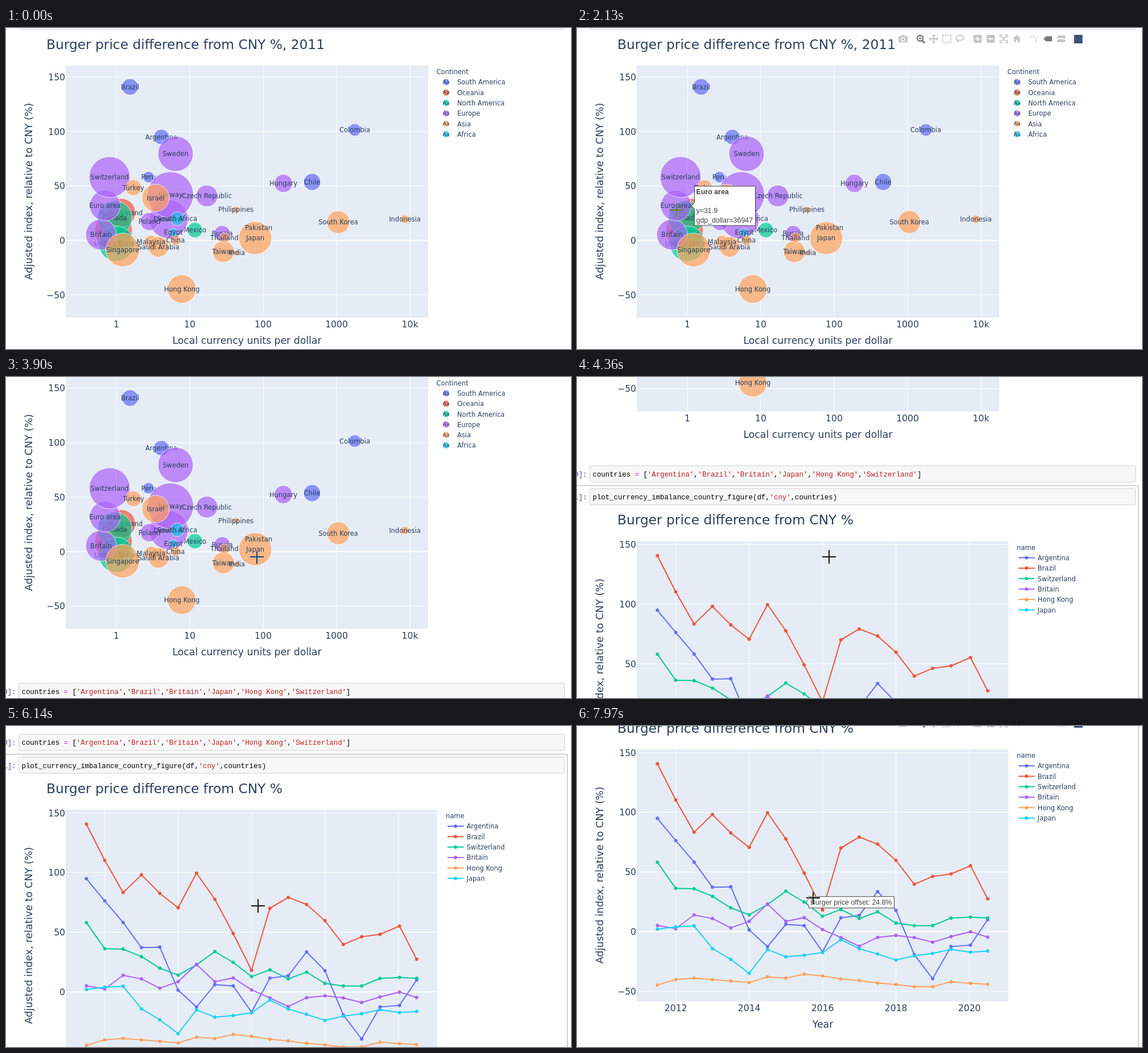
An HTML page for the animation above (8000 ms loop, 993 by 564 pixels).

```html
<!DOCTYPE html>
<html lang="en">
<head>
<meta charset="utf-8">
<title>Burger price charts</title>
<style>
html, body { margin: 0; width: 100%; height: 100%; overflow: hidden; background: #fff; }
svg { display: block; width: 100%; height: 100%; }
text { white-space: pre; }
.plot { font-family: "DejaVu Sans", Verdana, sans-serif; fill: #2a3f5f; }
.mono { font: 12.35px "Liberation Mono", monospace; fill: #000; }
.tip { font: 12.4px "Liberation Sans", Arial, sans-serif; fill: #444; }
#cursor { mix-blend-mode: difference; }
</style>
</head>
<body>
<svg id="stage" viewBox="0 0 993 564" xmlns="http://www.w3.org/2000/svg"></svg>
<script>
const LOOP = 8000, CHART2 = 576;
const BLUE = '#636efa', RED = '#ef553b', GREEN = '#00cc96',
      PURPLE = '#ab63fa', ORANGE = '#ffa15a', CYAN = '#19d3f3';

// name, x, y, radius
const continents = [
  ['South America', BLUE, [['Argentina', 273, 191.5, 13.5], ['Brazil', 218, 103.5, 14.5],
    ['Chile', 538, 270.5, 15], ['Colombia', 613, 179, 11], ['Peru', 250.5, 262, 10]]],
  ['Oceania', RED, [['Australia', 189, 356, 33], ['New Zealand', 202.5, 324.5, 25]]],
  ['North America', GREEN, [['Canada', 191, 334, 30.5], ['Mexico', 332, 355, 13.5],
    ['United States', 194, 379, 31]]],
  ['Europe', PURPLE, [['Britain', 167, 363, 27], ['Czech Republic', 353, 295, 19],
    ['Denmark', 286, 336, 34], ['Euro area', 174, 312, 27], ['Hungary', 487.5, 273, 16],
    ['Norway', 289, 293, 40.5], ['Poland', 252, 340, 16], ['Russia', 380, 361, 14],
    ['Sweden', 298, 221, 31], ['Switzerland', 182, 262, 36]]],
  ['Asia', ORANGE, [['China', 298, 373, 9], ['Hong Kong', 309, 458.5, 25],
    ['India', 406, 395, 5], ['Indonesia', 701, 336, 7.5], ['Israel', 263, 298.5, 24],
    ['Japan', 438, 369, 29], ['Malaysia', 255, 376, 12], ['Pakistan', 444, 351, 4],
    ['Philippines', 404, 319, 6], ['Saudi Arabia', 268, 384.5, 18], ['Singapore', 205, 390, 29.5],
    ['South Korea', 584, 341, 20], ['Taiwan', 382, 393, 19], ['Thailand', 384, 368.5, 9],
    ['Turkey', 224, 280.5, 14]]],
  ['Africa', '#19c0f0', [['Egypt', 294, 359, 7], ['South Africa', 301, 335, 12]]]
];

const series = [
  ['Argentina', BLUE, [94.9, 76.3, 58.2, 37.2, 37.5, 1.4, -12.6, 6, 5, -17, 11.5, 13.6, 33.5, 17.8, -19.3, -39.5, -12.6, -11.3, 10]],
  ['Brazil', RED, [140.6, 110.3, 83.3, 98.1, 82.6, 70.6, 99.6, 77.6, 49, 18.1, 70.1, 79.2, 73.3, 59.7, 39.7, 46.2, 48.3, 55.2, 27.4]],
  ['Switzerland', GREEN, [58.1, 36.2, 35.9, 29.6, 19.9, 14.1, 22.7, 33.8, 24.8, 12.8, 18.5, 10.9, 16.6, 7.1, 5, 5, 11.3, 12.1, 11.4]],
  ['Britain', PURPLE, [5.1, 2.5, 13.9, 10.9, 3.1, 8.6, 23.1, 8.6, 11.7, 1.7, -5, -12.3, -4.9, -3.3, -5, -8.9, -4.2, -0.1, -4.7]],
  ['Hong Kong', ORANGE, [-44.7, -40.2, -39, -40.2, -41.4, -42.7, -38, -39, -35.7, -37.2, -39.7, -41.1, -43.1, -44.4, -46.2, -46.2, -42.1, -43.3, -44.2]],
  ['Japan', CYAN, [2, 3.9, 4.7, -14.2, -23.4, -35, -15.1, -21.1, -19.8, -17.5, -6.8, -14.4, -18.8, -23.9, -20.3, -18.3, -14.9, -17.3, -16.4]]
];

// time, scroll offset (held until the next one)
const scrolls = [[0, 0], [3820, 12], [3900, 66.5], [3970, 115], [4050, 182], [4130, 250], [4200, 318],
  [4280, 390], [4360, 448.5], [4430, 474], [4510, 480], [4840, 505], [4960, 552], [5100, 576],
  [6100, 590], [6170, 632], [6250, 672], [6330, 704], [6400, 745], [6480, 772], [6570, 793],
  [6800, 775], [6880, 730], [6960, 696]];

// time, x, y (linear between)
const moves = [[70, 400, 493], [400, 350, 340], [810, 290, 228], [1210, 290, 228], [1520, 185, 268],
  [1670, 185, 268], [1900, 177, 308], [2050, 177, 310], [2130, 175, 320], [2290, 178, 358],
  [2440, 181, 364], [2520, 183, 379], [2900, 183, 379], [3050, 215, 388], [3250, 385, 364],
  [3440, 441, 316], [3900, 441, 316], [4200, 443, 316], [6400, 443, 316], [6720, 398, 240],
  [7040, 398, 240], [7110, 399, 242], [7260, 392, 225], [7400, 386, 212], [7560, 390, 232],
  [7720, 401, 262], [7890, 408, 285], [7970, 415, 302]];

// from, to, country, index, gdp
const bubbleTips = [[660, 1360, 'Sweden', 79.3, 48875], [1360, 1820, 'Switzerland', 58.1, 67246],
  [1820, 2200, 'Euro area', 31.9, 36947], [2200, 2980, 'Britain', 5.1, 36120],
  [2980, 3130, 'Singapore', -8.9, 43117], [3200, 3360, 'Russia', 6.3, 10437]];

// from, to, country
const lineTips = [[6720, 7110, 'Britain'], [7260, 7890, 'Brazil'], [7890, LOOP, 'Switzerland']];

const text = (x, y, s, size, anchor = 'start', more = '') =>
  `<text x="${x}" y="${y}" font-size="${size}" text-anchor="${anchor}" ${more}>${s}</text>`;
const rect = (x, y, w, h, fill, more = '') =>
  `<rect x="${x}" y="${y}" width="${w}" height="${h}" fill="${fill}" ${more}/>`;
const dot = (x, y, r, fill, more = '') =>
  `<circle cx="${x}" cy="${y}" r="${r}" fill="${fill}" ${more}/>`;
const path = (d, stroke, width = 1, fill = 'none') =>
  `<path d="${d}" stroke="${stroke}" stroke-width="${width}" fill="${fill}"/>`;
const each = (list, fn) => list.map(fn).join('');

function axes(width, top, zero, unit, x0, xLabels, xTitle, xMid, title) {
  const bottom = top + 443, mid = top + 221;
  let s = rect(105, top, width, 443, '#e5ecf6');
  s += each(xLabels, (label, i) => {
    const x = x0 + i * 129;
    return path(`M${x} ${top}V${bottom}`, '#fff') + text(x, bottom + 17, label, 15.6, 'middle');
  });
  s += each([150, 100, 50, 0, -50], v => {
    const y = zero - v * unit;
    return path(`M105 ${y}h${width}`, '#fff', v ? 1 : 2) +
      text(104, y + 5.7, String(v).replace('-', '\u2212'), 15.6, 'end');
  });
  return s + text(71, top - 29.5, title, 23.3) + text(xMid, bottom + 46, xTitle, 17.3, 'middle') +
    text(0, 0, 'Adjusted index, relative to CNY (%)', 17.7, 'middle', `transform="translate(46 ${mid}) rotate(-90)"`);
}

function bubbleChart() {
  return axes(637, 66, 373.3, 1.914, 194, ['1', '10', '100', '1000', '10k'],
      'Local currency units per dollar', 423.5, 'Burger price difference from CNY %, 2011') +
    each(continents, ([, color, list]) =>
      each(list, ([, x, y, r]) => dot(x, y, r, color, 'opacity=".7" stroke="#fff"')) +
      each(list, ([name, x, y]) => text(x, y + 4, name, 11.5, 'middle'))) +
    text(756.5, 81, 'Continent', 11.5) +
    each(continents, ([name, color], i) => {
      const y = 95 + i * 18.3;
      return dot(773.5, y, 5.5, color, 'opacity=".75"') + text(773.5, y + 3, 'Aa', 9.2, 'middle') +
        text(793, y + 4.4, name, 11.5);
    });
}

const pointX = i => 141.3 + 32.25 * i + (i === 17 ? 2 : 0);
const pointY = v => 481.2 - v * 2.096;

function lineChart() {
  return axes(653, 161, 481.2, 2.096, 173.7, [2012, 2014, 2016, 2018, 2020],
      'Year', 432, 'Burger price difference from CNY %') +
    each(series, ([, color, list]) =>
      path('M' + list.map((v, i) => `${pointX(i)} ${pointY(v)}`).join('L'), color, 2) +
      each(list, (v, i) => dot(pointX(i), pointY(v), 3, color))) +
    text(773, 176, 'name', 11.5) +
    each(series, ([name, color], i) => {
      const y = 190 + i * 18.35;
      return path(`M776 ${y}h28.5`, color, 2) + dot(790, y, 3, color) + text(809.5, y + 4.4, name, 11.5);
    });
}

function toolbar() {
  const soft = '#c5c5c9', dark = '#7a7a7c';
  const box = (x, mark) => rect(x - 7, 12, 14, 14, soft, 'rx="1"') + path(mark, '#fff', 2);
  return rect(565, 14.5, 16, 11, soft, 'rx="2"') + rect(570, 12.5, 6, 3, soft) +
    dot(573, 20, 3.2, soft, 'stroke="#fff" stroke-width="1.5"') +
    dot(603, 18, 5, 'none', `stroke="${dark}" stroke-width="2.4"`) +
    path('M607 22l4 4.5', dark, 3) + path('M600.5 18h5M603 15.5v5', dark, 1.3) +
    path('M620 19h14M627 12v14M622 17l-2 2 2 2M632 17l2 2-2 2M625 14l2-2 2 2M625 24l2 2 2-2', soft, 1.8) +
    rect(643, 12.5, 14, 13, 'none', `stroke="${soft}" stroke-width="2" stroke-dasharray="2.5 1.5"`) +
    path('M668 21c-4-4 0-9 6-8s8 6 3 8-9-1-9 1 3 1 2 4', soft, 1.8) +
    box(704, 'M700 19h8M704 15v8') + box(727, 'M723 19h8') +
    path('M743.5 17v-4.500h4M752.500 12.500h4v4.500M756.500 21v4.500h-4M747.500 25.500h-4v-4.500M746 15l8 8M754 15l-8 8', soft, 1.8) +
    path('M773 12l7 7h-2v6h-3.500v-4h-3v4h-3.500v-6h-2z', 'none', 0, soft) +
    path('M797 15h9M807 17v9', soft, 2) .replace('/>', ' stroke-dasharray="2.5 2"/>') +
    path('M820 19l4-4.500h11v9h-11z', 'none', 0, dark) +
    path('M843 16l3-3h12v5h-12zM843 23l3-3h12v5h-12z', 'none', 0, soft) +
    rect(873.5, 12, 15, 15, '#3f4f75');
}

const inputCell = y => rect(22.5, y, 959, 28.5, '#f7f7f7', 'stroke="#cfcfcf" rx="2"');
const prompt = (y, n) => `<text class="mono" x="17.500" y="${y}" text-anchor="end" style="fill:#303f9f">In [${n}]:</text>`;
const str = s => `<tspan fill="#ba2121">'${s}'</tspan>`;

function notebook() {
  const names = ['Argentina', 'Brazil', 'Britain', 'Japan', 'Hong Kong', 'Switzerland'];
  return inputCell(-26) + inputCell(604.5) + inputCell(644.5) +
    path('M-5 639.500H986.500V1268.500H-5', '#ababab') +
    prompt(623, 10) + prompt(663.5, 11) +
    `<text class="mono" x="27.500" y="623">countries <tspan fill="#a2f">=</tspan> [${names.map(str).join(',')}]</text>` +
    `<text class="mono" x="27.500" y="663.500">plot_currency_imbalance_country_figure(df,${str('cny')},countries)</text>` +
    rect(0, 1284, 993, 120, '#eee') + rect(0, 1284, 993, 6, 'url(#shade)');
}

function tipBox(x, y, w, h) {
  return path(`M${x} ${y}l5 -6V${y - h / 2}h${w}v${h}h${-w}V${y + 6}z`, '#444', 1, '#fff');
}

function bubbleTip([, , name, index, gdp]) {
  const [, x, y, r] = continents.flatMap(c => c[2]).find(b => b[0] === name);
  const left = x + r + 8.5;
  return tipBox(x + r + .5, y + .5, 107, 69) +
    text(left, y - 20, name, 12.4, 'start', 'font-weight="bold"') +
    text(left, y + 13, 'y=' + String(index).replace('-', '\u2212'), 12.4) +
    text(left, y + 29.5, 'gdp_dollar=' + gdp, 12.4);
}

function lineTip([, , name]) {
  const v = series.find(s => s[0] === name)[2][8], y = pointY(v);
  return tipBox(402.5, y + .5, Number.isInteger(v) ? 140 : 150, 20) +
    text(410.5, y + 4.8, `Burger price offset: ${v}%`, 12.4);
}

const stage = document.getElementById('stage');
stage.innerHTML = `<defs><linearGradient id="shade" x2="0" y2="1">
  <stop stop-color="#dcdcdc"/><stop offset="1" stop-color="#eee"/></linearGradient></defs>
  ${rect(0, 0, 993, 564, '#fff')}
  <g id="page">${notebook()}
    <g class="plot">${bubbleChart()}</g>
    <g class="plot" transform="translate(0 ${CHART2})">${lineChart()}</g>
    <g id="bar1">${toolbar()}</g>
    <g id="bar2" transform="translate(0 ${CHART2 + 96})">${toolbar()}</g>
    <g class="tip" id="tip1"></g>
    <g class="tip" id="tip2" transform="translate(0 ${CHART2})"></g>
  </g>
  <g id="cursor">${path('M-12 0H12M0 -12V12', '#fff', 2)}</g>`;

const [page, bar1, bar2, tip1, tip2, cursor] =
  ['page', 'bar1', 'bar2', 'tip1', 'tip2', 'cursor'].map(id => document.getElementById(id));

const clamp = v => Math.max(0, Math.min(1, v));
const held = (keys, t) => keys.filter(k => k[0] <= t).pop()[1];

function cursorAt(t) {
  const i = moves.findIndex(k => k[0] > t);
  if (i < 1) return moves[i ? moves.length - 1 : 0].slice(1);
  const [t0, x0, y0] = moves[i - 1], [t1, x1, y1] = moves[i], p = (t - t0) / (t1 - t0);
  return [x0 + (x1 - x0) * p, y0 + (y1 - y0) * p];
}

function showTip(node, tips, draw, t) {
  const i = tips.findIndex(([from, to]) => t >= from && t < to);
  if (node.dataset.tip === String(i)) return;
  node.dataset.tip = i;
  node.innerHTML = i < 0 ? '' : draw(tips[i]);
}

function render(t) {
  page.setAttribute('transform', `translate(0 ${-held(scrolls, t)})`);
  bar1.setAttribute('opacity', clamp((t - 70) / 300));
  bar2.setAttribute('opacity', clamp((t - 6480) / 300));
  cursor.setAttribute('visibility', t < 70 ? 'hidden' : 'visible');
  cursor.setAttribute('transform', `translate(${cursorAt(t).map(Math.round).join(' ')})`);
  showTip(tip1, bubbleTips, bubbleTip, t);
  showTip(tip2, lineTips, lineTip, t);
}

const start = performance.now();
function tick() {
  render((performance.now() - start) % LOOP);
  requestAnimationFrame(tick);
}
tick();
</script>
</body>
</html>
```
